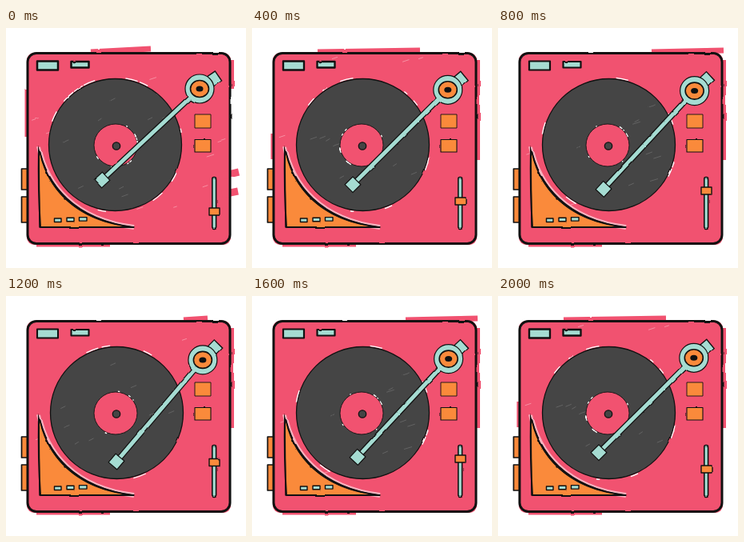
An HTML page that plays this animation: 300x300 px, repeating every 2400 ms.

```html
<!DOCTYPE html>
<html lang="en">
<head>
<meta charset="utf-8">
<title>Turntable</title>
<style>
  html, body { margin: 0; width: 100%; height: 100%; overflow: hidden; background: #fff; }
  svg { display: block; width: 100%; height: 100%; }
  .pose { opacity: 0; animation: 2.4s step-end infinite; }
  .pose:nth-of-type(1) { animation-name: first; }
  .pose:nth-of-type(2) { animation-name: second; }
  .pose:nth-of-type(3) { animation-name: third; }
  .pose:nth-of-type(4) { animation-name: fourth; }
  @keyframes first { 0% { opacity: 1 } 16.66%, 100% { opacity: 0 } }
  @keyframes second { 0% { opacity: 0 } 16.66% { opacity: 1 } 33.33% { opacity: 0 } 83.33%, 100% { opacity: 1 } }
  @keyframes third { 0% { opacity: 0 } 33.33% { opacity: 1 } 50% { opacity: 0 } 66.66% { opacity: 1 } 83.33%, 100% { opacity: 0 } }
  @keyframes fourth { 0% { opacity: 0 } 50% { opacity: 1 } 66.66%, 100% { opacity: 0 } }
</style>
</head>
<body>
<svg id="stage" viewBox="0 0 300 300">
  <filter id="soft" x="0" y="0" width="300" height="300" filterUnits="userSpaceOnUse" color-interpolation-filters="sRGB">
    <feTurbulence type="fractalNoise" baseFrequency=".05" numOctaves="2" seed="4"/>
    <feDisplacementMap in="SourceGraphic" scale="2" xChannelSelector="R" yChannelSelector="G"/>
    <feGaussianBlur stdDeviation=".35"/>
  </filter>
</svg>
<script>
const INK = '#111', PINK = '#f15270', TEAL = '#a5dcd2', ORANGE = '#fa8a3b', VINYL = '#454545';
const topSmears = [[106, 181], [82, 210], [192, 282], [222, 252]];
const knobHeights = [229.5, 216.5, 203.5, 208];

function randomFrom(seed) {
  const next = () => (seed = (seed * 16807) % 2147483647) / 2147483647;
  return (min, max) => min + next() * (max - min);
}

const shape = (tag, attributes, fill, width = 0, stroke = INK) => {
  const list = Object.entries(attributes).map(([name, value]) => `${name}="${value}"`).join(' ');
  return `<${tag} ${list} fill="${fill}" stroke="${width ? stroke : 'none'}" stroke-width="${width}"/>`;
};
const path = (d, fill, width, stroke) => shape('path', { d }, fill, width, stroke);
const box = (x, y, width, height, fill, line, rx = 0) => shape('rect', { x, y, width, height, rx }, fill, line);
const oval = ([cx, cy], rx, ry, fill, line) => shape('ellipse', { cx, cy, rx, ry }, fill, line);
const bar = (from, to, width, color) => path(`M${from}L${to}`, 'none', width, color);
const repeat = (count, draw) => Array.from({ length: count }, (_, i) => draw(i)).join('');

function arc([x, y], radius, start, sweep, width, color) {
  const point = a => [x + radius * Math.cos(a), y + radius * Math.sin(a)];
  return path(`M${point(start)}A${radius} ${radius} 0 0 1 ${point(start + sweep)}`, 'none', width, color);
}

// Pink fill that runs past the outline, most of all in the first pose.
function paint(pose) {
  const [left, right] = topSmears[pose];
  const loose = pose === 0;
  return box(26, 31, 255, 240, PINK, 0, 9)
    + bar([left, 30], [right, loose ? 26 : 28], 7, PINK)
    + bar([282, 40], [282, loose ? 76 : 165], 6, PINK)
    + bar([38, 270], [130, 270], 7, PINK)
    + (loose ? bar([270, 185], [291, 180], 9, PINK) + bar([270, 208], [290, 204], 9, PINK) : '')
    + (pose < 2 ? bar([26, loose ? 76 : 132], [26, loose ? 136 : 164], 5, PINK) : '');
}

function scuffs(pose, random) {
  return repeat(16 - pose * 4, () => {
    const x = random(32, 265), y = random(38, 266), length = random(4, 11);
    return path(`M${x} ${y}l${length} ${-length / 3}`, 'none', 0.7, '#f9a9b8');
  });
}

function record(pose, random) {
  const center = [pose ? 138.5 : 136.5, 146], spindle = [137, 146.5];
  const gaps = (middle, radius) => repeat(10 - pose * 2, () =>
    arc(middle, radius, random(0, 6.28), random(0.05, 0.2), 1.3, '#fff'));
  const scratches = repeat(8, () => {
    const angle = random(0, 6.28), radius = random(35, 72);
    const x = center[0] + radius * Math.cos(angle), y = center[1] + radius * Math.sin(angle);
    return path(`M${x} ${y}l${random(4, 10)} -3`, 'none', 0.6, '#777');
  });
  return oval(center, 83, 82.5, VINYL, 1.3) + gaps(center, 84.2) + scratches
    + oval(spindle, 27, 26.5, PINK, 0.9) + gaps(spindle, 27.5)
    + oval([138, 147.5], 4.7, 4.7, '#444', 1.3);
}

function corner() {
  const curve = 'M41 148C50 196 86 240 160 249';
  return path(curve, 'none', 6, '#f9b3c0')
    + path(curve + 'L42 249Z', ORANGE, 1.5)
    + path(curve + 'C88 243 48 200 41 148Z', INK, 1)
    + path('M41 149Q40 205 43 249L160 249', 'none', 2)
    + repeat(3, i => box(60.5 + i * 15.5, 238 - i * 0.7, 8.5 + i * 0.5, 4.5, TEAL, 1.4));
}

function tonearm(pose) {
  const pivot = [246 - 4 * 0.3 ** pose, 76 + pose * 1.3];
  const head = [120 + pose * 6, 190 + pose * 5.7];
  const angle = Math.atan2(pivot[1] - head[1], pivot[0] - head[0]) * 180 / Math.PI;
  return bar(pivot, [266, 59.5], 16, INK) + bar(pivot, [265, 60.5], 13.4, TEAL)
    + bar(pivot, head, 7.5, INK) + oval(pivot, 18, 18, TEAL, 1.2)
    + bar(pivot, head, 5, TEAL)
    + `<g transform="translate(${head}) rotate(${angle})">${box(-7, -7, 14, 14, TEAL, 1.2)}</g>`
    + oval(pivot, 11.5, 10.5, ORANGE, 1.6) + oval(pivot, 4.5, 3.5, INK);
}

function drawPose(pose) {
  const random = randomFrom(71 + pose * 913);
  const line = 2.5 - pose * 0.15;
  return '<g class="pose"><g filter="url(#soft)" stroke-linejoin="round">'
    + box(19.5, 176, 8, 26, ORANGE, 1.7) + box(19.5, 211, 8, 32, ORANGE, 1.7)
    + paint(pose) + scuffs(pose, random)
    + box(27, 31.5, 253, 238, 'none', 3, 11)
    + box(39, 41.5, 26, 11, TEAL, line) + box(81.5, 42, 22, 7.5, TEAL, line)
    + record(pose, random) + corner()
    + box(236, 108, 20, 17, ORANGE, 0.9) + box(236, 139.5, 20, 15.5, ORANGE, 1.1)
    + box(257.8, 187.5, 4.8, 63, TEAL, 1.6, 2)
    + box(254, knobHeights[pose] - 4.5, 13, 9, ORANGE, 1.4)
    + tonearm(pose) + '</g></g>';
}

document.getElementById('stage').innerHTML += repeat(4, drawPose);
</script>
</body>
</html>
```
